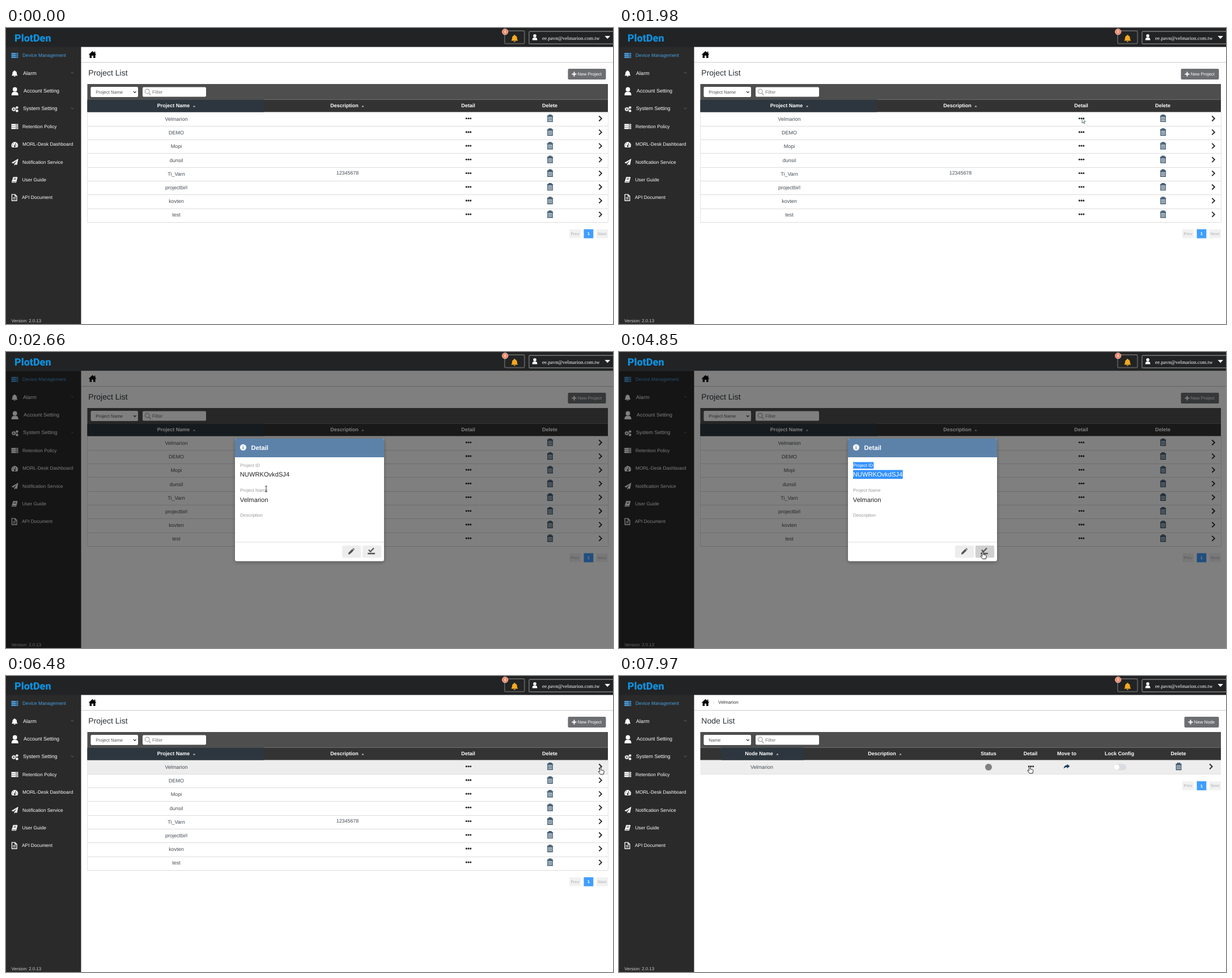
An HTML page for the animation above (8 s loop, 1071 by 523 pixels).

```html
<!DOCTYPE html>
<html lang="en">
<head>
<meta charset="utf-8">
<title>Project list</title>
<style>
html, body { margin: 0; width: 100%; height: 100%; overflow: hidden; background: #fff; }
svg { display: block; width: 1071px; height: 523px; font-family: "Liberation Sans", Arial, sans-serif; text-rendering: geometricPrecision; }
text { white-space: pre; }
.b { font-weight: 700; }
.m { text-anchor: middle; }
</style>
</head>
<body>
<svg id="stage" viewBox="0 0 1071 523" xmlns="http://www.w3.org/2000/svg"></svg>
<script>
const text = (x, y, s, size, fill, cls = '') => `<text x="${x}" y="${y}" font-size="${size}" fill="${fill}" class="${cls}">${s}</text>`;
const rect = (x, y, w, h, fill, extra = '') => `<rect x="${x}" y="${y}" width="${w}" height="${h}" fill="${fill}" ${extra}/>`;
const disc = (x, y, r, fill, extra = '') => `<circle cx="${x}" cy="${y}" r="${r}" fill="${fill}" ${extra}/>`;
const path = (d, fill, extra = '') => `<path d="${d}" fill="${fill}" ${extra}/>`;
const line = (d, stroke, w) => path(d, 'none', `stroke="${stroke}" stroke-width="${w}"`);
const at = (x, y, body, k = 1) => `<g transform="translate(${x} ${y}) scale(${k})">${body}</g>`;

const NAVY = '#1d3c58', INK = '#20262c';

// Icons, drawn around their own centre
const bell = c => path('M0-5.5c-.8 0-1 .6-1 1-2 .5-2.8 2-2.8 4C-3.8 2-5 2.5-5 3.7H5C5 2.5 3.8 2 3.8-.5c0-2-.8-3.5-2.8-4 0-.4-.2-1-1-1ZM-1.5 4.3a1.5 1.3 0 0 0 3 0Z', c);
const person = disc(0, -3.4, 3.9, '#fff') + path('M-6 7.3c0-5 1.6-6.4 6-6.4s6 1.4 6 6.4Z', '#fff');
const server = (c, hole) => [-4.6, -1.4, 1.8].map(y => rect(-6, y, 12, 2.6, c, 'rx=".5"') + rect(1.5, y + .9, 3.2, .8, hole)).join('');
const gear = (x, y, r) => disc(x, y, r, 'none', 'stroke="#fff" stroke-width="1.7"') +
  disc(x, y, r + 1.2, 'none', 'stroke="#fff" stroke-width="1" stroke-dasharray="1.3 1.2"');
const gauge = path('M-4.6 4.6A5.9 5.9 0 1 1 4.6 4.6Z', '#fff') +
  line('M0 2.6 1.6-2.6', '#2a2a2a', 1.1) + disc(0, 2.4, 1.5, '#2a2a2a') +
  [[-3.6, .6], [-2.4, -2.3], [3.7, .6]].map(([x, y]) => disc(x, y, .7, '#2a2a2a')).join('');
const plane = path('M6-6-6 1-2.6 2.5 4-3.6-.9 3.4V6.2L1.1 4 3.9 5Z', '#fff');
const book = path('M-2.3-5H4.6q.9 0 .7.9L3.2 4.2q-.2.8-1 .8H-4.2q-1 0-.8-1.2Z', '#fff') +
  line('M-1.2-2.6H3M-1.7-.8H2.5M-4 3.4H2.4', '#2a2a2a', .8);
const file = path('M-4.2-5.4H1.4L4.4-2.4V5.4H-4.2Z', 'none', 'stroke="#fff" stroke-width="1.3"') +
  line('M1.2-5.2V-2.2H4.2M-2.3 0H2.4M-2.3 2.4H2.4', '#fff', 1.1);
const trash = line('M-2-4.8V-6H2V-4.8M-5.2-4.2H5.2', NAVY, 1.3) +
  path('M-4.2-2.7H4.2V5.8H-4.2Z', 'none', `stroke="${NAVY}" stroke-width="1.2"`) +
  line('M-2.1-1.4V4.8M0-1.4V4.8M2.1-1.4V4.8', NAVY, 1);
const dots = [-3.7, 0, 3.7].map(x => disc(x, 0, 1.55, INK)).join('');
const chevron = line('M-2.4-4.5 2.2 0-2.4 4.5', INK, 1.8);
const down = line('M-2.4-1.2 0 1.2 2.4-1.2', '#777', .8);
const sort = path('M-2.2 1.2H2.2L0-1.4Z', '#bbb');
const plus = c => line('M-4 0H4M0-4V4', c, 2);
const house = path('M0-6.2 7 .2H5V6H1.5V1.8H-1.5V6H-5V.2H-7Z', '#000') + rect(3.2, -5.3, 1.7, 3.5, '#000');
const share = path('M.6-4.6 5.4-.6.6 3.2V1.1C-2 1-4 1.6-5.2 4.2-5.2 0-3-2.2.6-2.4Z', NAVY);
const pencil = path('M-5.4 5.4-4.8 2.2 1.8-4.4 4.4-1.8-2.2 4.8ZM2.5-5 3.6-6 6-3.6 5-2.5Z', '#555');
const tick = line('M-4.6-2.2-1.4.9 4.4-5.4', '#555', 2.2) + rect(-6.3, 3, 12.8, 2.6, '#555');

const menu = [
  ['Device Management', 29, 8.4, at(15.4, 48.6, server('#4a9fe0', '#2a2a2a'))],
  ['Alarm', 30, 9.1, at(15.2, 80.5, bell('#fff')) + at(117, 79, down)],
  ['Account Setting', 31, 9, at(15.7, 111.8, person)],
  ['System Setting', 30, 9, gear(13.7, 143.5, 2.2) + gear(19.4, 140.6, 1) + gear(19.4, 146.4, 1) + at(117, 142, down)],
  ['Retention Policy', 29, 8.4, at(15.4, 174, server('#fff', '#2a2a2a'))],
  ['MORL-Desk Dashboard', 29, 8.4, at(15.4, 206.3, gauge)],
  ['Notification Service', 29, 8.4, at(15.6, 237, plane)],
  ['User Guide', 28.5, 8.4, at(15, 268.3, book)],
  ['API Document', 28, 8.4, at(14.6, 299.6, file)]
];
const sidebar = rect(0, 33, 132.5, 490, '#2a2a2a') +
  menu.map(([s, x, size, icon], i) => icon + text(x, 51.4 + 31.35 * i, s, size, i ? '#fff' : '#4a9fe0')).join('') +
  text(9.5, 519.8, 'Version: 2.0.13', 7.9, '#ccc');

const header = rect(0, 0, 1071, 33.5, '#222324') +
  `<text x="15" y="23.8" font-size="18" font-weight="900" fill="#0d8fdc" font-family="Roboto, sans-serif">PlotDen</text>` +
  rect(879.8, 5, 35, 22.6, 'none', 'rx="2" stroke="#5c5c5c" stroke-width="1.8"') + at(897.3, 18.3, bell('#f5a81f'), 1.15) +
  disc(880.6, 6.7, 5.2, '#ee8465', 'stroke="#f7d9cd" stroke-width=".8"') + text(880.6, 9.2, '8', 7, '#fff', 'm') +
  rect(922.8, 6, 160, 22, 'none', 'rx="2" stroke="#666" stroke-width="1.8"') + at(933, 16.2, person, .72) +
  `<text x="946" y="20.6" font-size="9" fill="#fff" font-family="Liberation Serif, Times, serif">ee.pavn@velmarion.com.tw</text>` +
  path('M1056.5 14H1066L1061.2 19.2Z', '#fff');

const pager = y => rect(994, y, 20, 15.5, '#f1f1f1') + text(1004, y + 10.2, 'Prev', 7, '#c0c0c4', 'm b') +
  rect(1019.5, y - .3, 16.8, 16, '#409eff') + text(1027.8, y + 10.4, '1', 7.5, '#fff', 'm b') +
  rect(1041.5, y, 20.5, 15.5, '#f1f1f1') + text(1051.7, y + 10.2, 'Next', 7, '#c0c0c4', 'm b');

// Frame shared by both lists: title, button, filter bar and column heads
function list(title, button, bx, option, tint, heads) {
  return text(145.3, 84.4, title, 14, '#2b3138') +
    rect(bx, 72, 1058.5 - bx, 19, '#6d6e71', 'rx="2"') + at(bx + 11, 81.5, plus('#fff')) + text(bx + 17.3, 84.4, button, 7.8, '#fff') +
    rect(143.5, 99, 918.5, 27.5, '#4e4e4e') +
    rect(149.5, 104, 83.5, 18, '#fff', 'rx="2"') + text(158.3, 115.8, option, 7.9, '#555') +
    line('M225 112 227.3 114.4 229.6 112', '#333', 1.2) +
    rect(241, 104.5, 112, 17, '#fff', 'rx="2"') + disc(249.2, 112, 3.8, 'none', 'stroke="#bbb" stroke-width="1.7"') +
    line('M252 115 255.5 118.6', '#bbb', 2) + text(258, 115.9, 'Filter', 8.4, '#757575') +
    rect(143.5, 126.5, 918.5, 22, '#333') + rect(...tint, '#2d363e') +
    heads.map(([x, s, arrow]) => text(x, 140.3, s, 9, '#fff', 'm b') + (arrow ? at(arrow, 138.2, sort) : '')).join('');
}

const rowY = i => 149 + 24.28 * i;
const names = ['Velmarion', 'DEMO', 'Mopi', 'dunsil', 'Ti_Varn', 'projectbirl', 'kovten', 'test'];
const projects = list('Project List', 'New Project', 991.5, 'Project Name', [143.5, 126.5, 311.5, 22],
    [[295.5, 'Project Name', 332], [597, 'Description', 629.5], [815.5, 'Detail'], [959.5, 'Delete']]) +
  names.map((s, i) => {
    const y = 159.7 + 24.2 * i;
    return text(300.6, y + 4.2, s, 9, '#444c54', 'm') + at(816, y, dots) + at(960, y, trash) + at(1048.7, y + .3, chevron) +
      rect(143.5, Math.round(rowY(i + 1) - .4), 918.5, 1, '#dcdcdc');
  }).join('') +
  text(602.5, 259.2, '12345678', 8.9, '#444c54', 'm') +
  rect(143, 149, 1, 194, '#e4e4e4') + rect(1062, 149, 1, 194, '#e4e4e4') + pager(355.8);

const nodes = text(166, 49.5, '/', 8, '#ccc') + text(175, 49.4, 'Velmarion', 8, '#333') +
  list('Node List', 'New Node', 997.5, 'Name', [180, 126.5, 146, 22],
    [[247, 'Node Name', 279.5], [464, 'Description', 496.5], [652, 'Status'], [726, 'Detail'], [790, 'Move to'], [883, 'Lock Config'], [987, 'Delete']]) +
  text(252, 163.9, 'Velmarion', 9, '#444c54', 'm') + disc(652, 161, 6, '#808080') + at(727, 159.8, dots) + at(790, 160, share) +
  rect(872, 155.6, 23, 11, '#d9dde1', 'rx="5.5"') + disc(877.8, 161.1, 4.9, '#fff') +
  at(987.5, 159.8, trash) + at(1044.5, 160, chevron) + rect(143.5, 173, 918.5, 1, '#e2e2e2') + pager(186.2);

const idText = (a, b) => text(413, 203.2, 'Project ID', 8, a) + text(412.8, 220.3, 'NUWRKOvkdSJ4', 11.15, b);
const modal = rect(404, 153, 263, 216.5, '#fff', 'rx="3" filter="url(#shade)"') +
  path('M404 186V156q0-3 3-3H664q3 0 3 3V186Z', '#5c82aa') +
  disc(418.4, 168.5, 5.5, '#fff') + text(418.4, 172, 'i', 9.5, '#5c82aa', 'm b') + text(432.5, 173.2, 'Detail', 11.2, '#fff', 'b') +
  idText('#999', '#222') +
  `<g clip-path="url(#picked)">${rect(413, 194.5, 36.3, 11.7, '#3390ff')}${rect(413, 208.5, 87.6, 15.7, '#3390ff')}${idText('#fff', '#fff')}</g>` +
  text(413, 247.2, 'Project Name', 8, '#999') + text(412.8, 264.6, 'Velmarion', 11.2, '#222') + text(413, 291.2, 'Description', 8, '#999') +
  rect(404, 335.5, 263, 1, '#ddd') +
  rect(593, 342, 33.3, 21.4, '#ededed', 'rx="2"') + at(609.2, 352.3, pencil) +
  rect(628.8, 342, 33.3, 21.4, '#ededed', 'rx="2" id="ok"') + at(644.5, 351.8, tick);

const cursors = {
  arrow: path('M0 0V9L2.1 7.1 3.5 10.2 4.8 9.6 3.4 6.6H6.2Z', '#fff', 'stroke="#2f5a40" stroke-width=".8"'),
  hand: path('M-1.2.8C-1.2-.4 1-.4 1 .8V5l4 .9c1 .3 1.4.8 1.2 2L5.3 12.6H-.4L-3.7 8.3c-.6-1 .6-1.8 1.4-1L-1.2 8.2Z', '#fff', 'stroke="#111" stroke-width=".9"'),
  beam: line('M-2-5H-.6Q0-5 0-4.4V4.4Q0 5-.6 5H-2M2-5H.6Q0-5 0-4.4M0 4.4Q0 5 .6 5H2', '#222', .9)
};

const stage = document.getElementById('stage');
stage.innerHTML = `<defs>
  <clipPath id="picked"><rect id="pickA" y="194" height="13"/><rect id="pickB" y="208" height="17"/></clipPath>
  <filter id="shade" x="-10%" y="-10%" width="120%" height="125%"><feDropShadow dx="0" dy="2" stdDeviation="3" flood-opacity=".3"/></filter>
</defs>` +
  rect(0, 0, 1071, 523, '#fff') + rect(132, 60, 939, 1, '#d6d6d6') + rect(132, 61, 939, 1, '#f0f0f0') +
  at(152.6, 47, house) + rect(143.5, 149, 918.5, 24, '#ededed', 'id="hover"') +
  `<g id="projects">${projects}</g><g id="nodes">${nodes}</g>` + sidebar +
  rect(0, 33.5, 1071, 489.5, '#000', 'id="dim"') + `<g id="modal">${modal}</g>` + header +
  `<g id="cursor">${Object.entries(cursors).map(([k, s]) => `<g id="${k}">${s}</g>`).join('')}</g>`;

const $ = id => document.getElementById(id);
const set = (id, attrs) => { for (const k in attrs) $(id).setAttribute(k, attrs[k]); };
const show = (id, on) => { $(id).style.display = on ? '' : 'none'; };
const clamp = v => Math.max(0, Math.min(1, v));

// The screen refreshes in bursts: start, end, number of steps
const bursts = [[220, 940, 10], [1030, 1180, 3], [1330, 1730, 6], [1900, 2660, 11], [2740, 3520, 11], [3590, 3910, 5],
  [4310, 4850, 8], [5250, 5250, 1], [5420, 6180, 11], [6260, 6480, 4], [6790, 6960, 3], [7250, 7800, 8], [7970, 7970, 1]];
function snap(t) {
  const b = bursts.filter(([s]) => s <= t).pop();
  if (!b) return 0;
  const [s, e, n] = b;
  if (n < 2) return s;
  const step = (e - s) / (n - 1);
  return Math.min(e, s + Math.floor((t - s) / step + .001) * step);
}

// Pointer track: time, x, y
const track = [[220, 790, 386], [940, 816, 157], [1030, 815, 153], [1180, 817, 157], [1330, 813, 159], [1530, 811, 159],
  [1730, 817, 159], [2050, 817, 159], [2660, 459, 242], [2980, 510, 216], [3130, 508, 217], [3520, 440, 203], [3910, 412, 201],
  [4230, 412, 201], [4850, 642, 353], [5500, 643, 353], [6180, 1041, 161], [6480, 1049, 161], [7170, 1049, 161],
  [7500, 880, 166], [7800, 726, 161], [7970, 724.6, 159.3]];
const kinds = [[0, ''], [220, 'arrow'], [930, 'hand'], [1900, 'arrow'], [2560, 'beam'], [4400, 'arrow'], [4750, 'hand'],
  [5560, 'arrow'], [6170, 'hand'], [7300, 'arrow'], [7710, 'hand']];
function pointer(t) {
  const i = track.findIndex(k => k[0] > t);
  if (i < 1) return i ? track[track.length - 1].slice(1) : track[0].slice(1);
  const [a, x, y] = track[i - 1], [b, x2, y2] = track[i];
  const u = (t - a) / (b - a), e = u * u * (3 - 2 * u);
  return [x + (x2 - x) * e, y + (y2 - y) * e];
}
const ease = (t, start) => 1 - (1 - clamp((t - start) / 250)) ** 2;

function draw() {
  const t = snap(performance.now() % 8000);
  const [x, y] = pointer(t);
  const onNodes = t >= 6790;
  show('projects', !onNodes);
  show('nodes', onNodes);

  const vis = ease(t, 1990) - ease(t, 5372);
  const k = 1 + .1 * (1 - vis);
  show('modal', vis > 0);
  set('dim', { opacity: .5 * vis });
  set('modal', { opacity: vis, transform: `translate(535.5 261.5) scale(${k}) translate(-535.5 -261.5)` });

  const free = t >= 220 && t < 1900 || t > 5560;
  const row = Math.floor((y - 149) / 24.28);
  show('hover', free && row >= 0 && row < 8);
  set('hover', { y: rowY(row) });

  // Backwards text selection: value line first, then its label
  const drag = t >= 3130, upper = drag && (y < 207 || t > 3520);
  const from = t >= 3910 ? 412 : x;
  set('pickA', { x: from, width: upper ? Math.max(0, 450 - from) : 0 });
  set('pickB', { x: upper ? 412 : x, width: drag ? Math.max(0, 501 - (upper ? 412 : x)) : 0 });

  set('ok', {
    fill: t >= 5420 ? '#eee' : t >= 4770 ? '#d0d0d0' : '#ededed',
    stroke: t >= 5250 ? '#777' : 'none', 'stroke-width': 1.4
  });

  const kind = kinds.filter(([s]) => s <= t).pop()[1];
  for (const c in cursors) show(c, c === kind);
  set('cursor', { transform: `translate(${x} ${y})` });
  requestAnimationFrame(draw);
}
draw();
</script>
</body>
</html>
```
